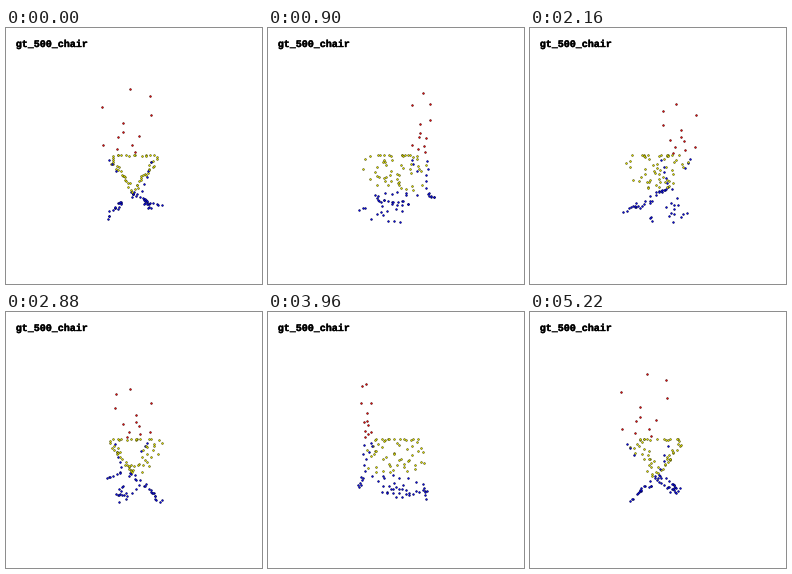
A matplotlib script for the animation above (5.4 s loop, 256 by 256 pixels).

```python
import numpy as np
import matplotlib.pyplot as plt
from matplotlib.animation import FuncAnimation
from matplotlib.colors import to_rgb
from matplotlib.patheffects import withStroke

SIZE, DPI = 256, 100
FRAMES, STEP_MS = 30, 180
FOCAL = SIZE / 2 / np.tan(np.radians(30))  # 60 degree field of view
PX = 72 / DPI
RED, YELLOW, BLUE = "#e00c0c", "#dcdc00", "#0808e0"

rng = np.random.default_rng(12)


def strew(n, start, end, depth=1.0, jitter=0.7):
    """Evenly spread points from start to end, scattered in z by +-depth."""
    t = (np.arange(n) + rng.random(n))[:, None] / n
    pts = np.array(start) + t * np.subtract(end, start)
    pts += rng.uniform(-jitter, jitter, pts.shape)
    pts[:, 2] += depth * rng.permutation(np.linspace(-1, 1, n))
    return pts


# Upright back: loose dots in the plane z = 31
back_xy = [(-3, 57), (14, 51), (-27, 42), (15, 35), (-9, 28), (-9, 20),
           (-13, 16), (5, 17), (-1, 9), (-26, 9), (1, 3), (-14, 6)]
back = np.array([(x, y, 31) for x, y in back_xy], float)

# Seat: flat rim at height 0 with a V-shaped sling below it
rim = strew(13, (-23, 0, 0), (23, 0, 0), depth=22, jitter=0.2)
sling = np.vstack([strew(21, (side * 23, -2, 0), (side, -34, 0), depth=27)
                   for side in (-1, 1)])

# Crossed legs: two broad sheets, the rear frame and the front feet
legs = np.vstack([
    strew(3, (-24, 0, 28), (-15, -15, 30)),
    strew(5, (17, -2, 28), (7, -32, 29)),
    strew(7, (6, -36, 31), (27, -44.5, 31)),
    strew(7, (0, -38, 0), (1, -39, 0), depth=23, jitter=4),
    strew(13, (-11, -45, 4), (-26, -61, 4), depth=16, jitter=1),
    strew(3, (-11, -51, -27), (-19, -56, -32)),
    strew(11, (10, -46, -8), (18, -54, -8), depth=15, jitter=1),
    strew(5, (1, -41, -28), (21, -56, -29)),
])

parts = [(back, RED), (rim, YELLOW), (sling, YELLOW), (legs, BLUE)]
cloud = np.vstack([pts for pts, _ in parts])
colors = np.array([to_rgb(c) for pts, c in parts for _ in pts])

fig = plt.figure(figsize=(SIZE / DPI, SIZE / DPI), dpi=DPI, facecolor="white")
ax = fig.add_axes([0, 0, 1, 1])
ax.set(xlim=(0, SIZE), ylim=(SIZE, 0))
ax.axis("off")
ax.text(9.8, 19, "gt_500_chair", family="Liberation Mono", weight="bold",
        size=10 * PX, color="black",
        path_effects=[withStroke(linewidth=0.4 * PX, foreground="black")])
dots = ax.scatter(cloud[:, 0], cloud[:, 1], s=(1.8 * PX) ** 2,
                  linewidths=0.5 * PX, snap=False)


def draw(i):
    a = 2 * np.pi * i / FRAMES
    x, y, z = cloud.T
    side = x * np.cos(a) + z * np.sin(a)
    depth = z * np.cos(a) - x * np.sin(a)
    zoom = FOCAL / (FOCAL - depth)
    pos = np.c_[side * zoom, -y * zoom] + SIZE / 2
    order = np.argsort(depth)
    dots.set_offsets(np.floor(pos[order]) + 0.5)
    dots.set_facecolors(colors[order])
    dots.set_edgecolors(colors[order] * 0.3)
    return [dots]


anim = FuncAnimation(fig, draw, frames=FRAMES, interval=STEP_MS,
                     repeat=True, repeat_delay=0)
plt.show()
```
